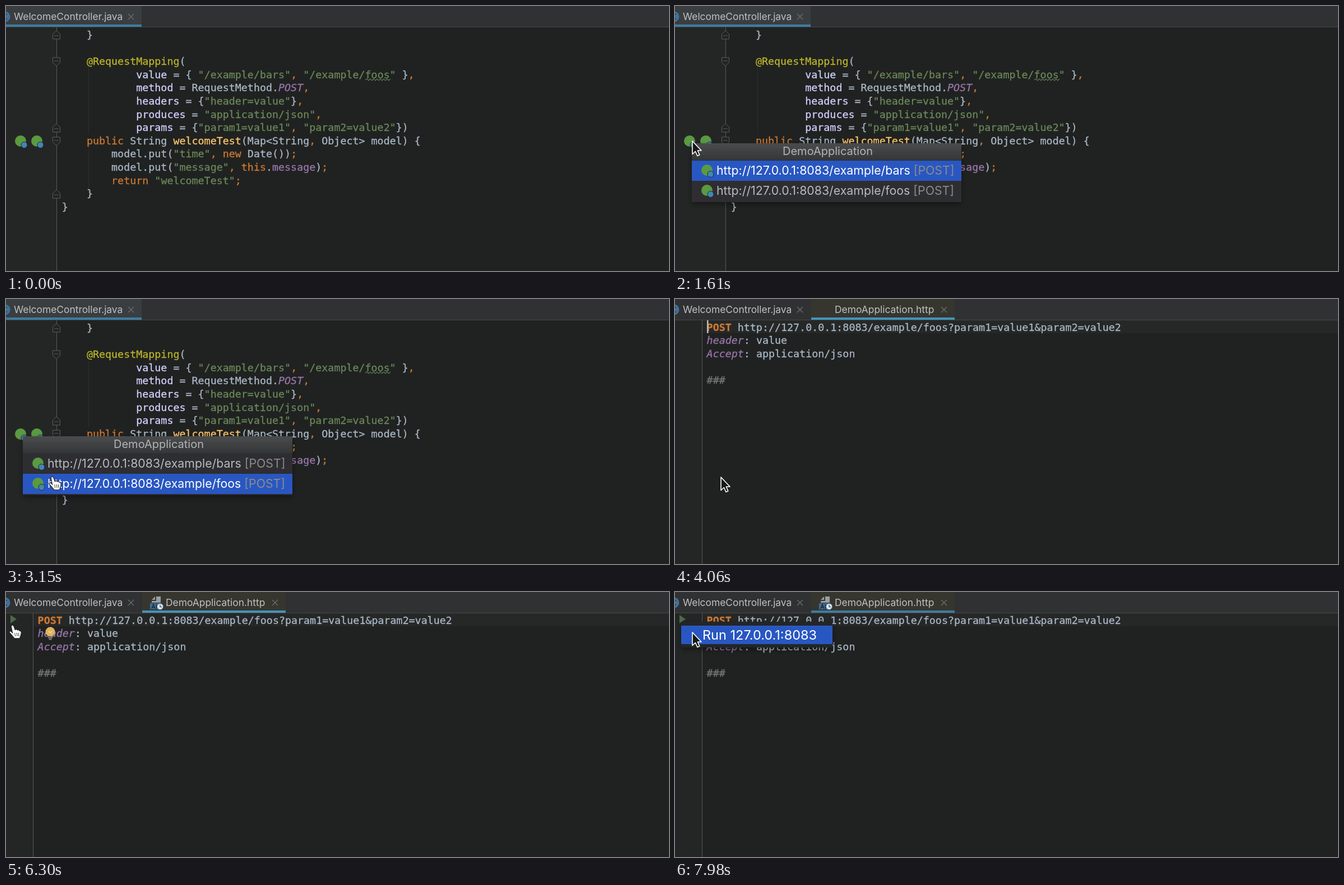
Recreate the animation shown at these times as an HTML page. Size 1183 by 473 pixels, loop 8000 ms.

```html
<!DOCTYPE html>
<html lang="en">
<head>
<meta charset="utf-8">
<title>HTTP request from the editor</title>
<style>
html, body { margin: 0; width: 100%; height: 100%; overflow: hidden; background: #202221; }
svg { display: block; width: 1183px; height: 473px; }
text { white-space: pre; fill: #a9b7c6; }
.code { font: 18.345px "DejaVu Sans Mono", monospace; }
.code tspan { stroke: currentColor; stroke-width: .3; fill: currentColor; }
.code { color: #a9b7c6; }
.ui { font: 17.4px Inter, sans-serif; fill: #bfc1c2; }
.row { font: 21.3px Inter, sans-serif; fill: #b8babc; }
.title { font: 20px Inter, sans-serif; fill: #b2b4b6; text-anchor: middle; }
.menu { font: 23.5px Inter, sans-serif; fill: #fff; }
.key { color: #cc7832; }
.str { color: #6a8759; }
.ann { color: #bbb529; }
.attr { color: #d0d0ff; }
.fn { color: #ffc66d; }
.field { color: #9876aa; }
.const { color: #9876aa; font-style: italic; }
.verb { color: #cc7832; font-weight: bold; }
.note { color: #747676; }
.dim { fill: #8a8c88; }
</style>
</head>
<body>
<svg id="stage" viewBox="0 0 1183 473" xmlns="http://www.w3.org/2000/svg">
  <defs>
    <linearGradient id="head" x1="0" y1="0" x2="0" y2="1">
      <stop offset="0" stop-color="#4a4c4d"/><stop offset="1" stop-color="#343637"/>
    </linearGradient>
    <filter id="shade" x="-10%" y="-20%" width="120%" height="150%">
      <feDropShadow dx="0" dy="4" stdDeviation="5" flood-color="#000" flood-opacity=".4"/>
    </filter>
    <g id="close"><path d="M-5-5L5 5M5-5L-5 5" stroke="#66696b" stroke-width="1.5"/></g>
    <g id="bean">
      <circle r="10" fill="#5a9a41"/>
      <circle cx="6.5" cy="7" r="5.5" fill="#3f87b5" stroke="#232525"/>
    </g>
    <g id="foldStart"><path d="M-6.5-7H6.5V2L0 8L-6.5 2Z M-4-1H4" fill="#222423" stroke="#5a5c5d"/></g>
    <g id="foldEnd"><path d="M-6.5 8H6.5V-1L0-7L-6.5-1Z M-4 2H4" fill="#222423" stroke="#5a5c5d"/></g>
  </defs>

  <rect width="1183" height="473" fill="#202221"/>
  <rect width="1183" height="37" fill="#2f3132"/>

  <g id="javaView">
    <rect y="38" width="90" height="435" fill="#242625"/>
    <path d="M90.5 38V473" stroke="#55585a"/>
    <path d="M147.5 110V229M147.5 252V325" stroke="#2d302f"/>
    <g id="folds"></g>
    <use href="#bean" x="26" y="241"/>
    <use href="#bean" x="55" y="241"/>
    <g id="java" class="code"></g>
    <path id="wave" fill="none" stroke="#5f7d52" stroke-width="1.2"/>
    <rect width="242" height="37" fill="#3a3e40"/>
    <rect y="33" width="242" height="4" fill="#3f7ba0"/>
  </g>

  <g id="httpView">
    <rect y="38" width="48" height="435" fill="#242625"/>
    <rect x="49" y="38" width="1134" height="23" fill="#262827"/>
    <path d="M48.5 38V473" stroke="#55585a"/>
    <g id="http" class="code"></g>
    <rect id="caret" x="57" y="38" width="2.5" height="23" fill="#b9bbbc"/>
    <rect x="243" width="256" height="37" fill="#36362f"/>
    <rect id="underline" x="243" y="33" width="256" height="4"/>
    <text class="ui" x="285" y="25">DemoApplication.http</text>
    <use href="#close" x="480" y="19"/>
    <g id="extras">
      <path d="M8 41L19 48.500L8 56Z" fill="#4c6a46"/>
      <path d="M268 8H276V19H260V16H268Z" fill="#9a9fa2"/>
      <path d="M260 14L266 8V14Z" fill="#9a9fa2"/>
      <rect x="257" y="20" width="19" height="11" fill="#3e6c97"/>
      <path d="M260 30L263 22L266 30M261 27.500H265M268.500 22V30" fill="none" stroke="#1f2a34" stroke-width="1.500"/>
      <circle cx="275" cy="26" r="5.500" fill="#e4eaf0" stroke="#3e6c97"/>
      <path d="M275 22.500V26.500H278" fill="none" stroke="#33597c" stroke-width="1.300"/>
      <circle cx="79" cy="71" r="8.500" fill="#e0b45c"/>
      <path d="M76 70L79 73L82 70" fill="none" stroke="#f3dca6" stroke-width="1.500"/>
      <path d="M75 81.500H83M76.500 84.500H81.500" stroke="#8b8c8a" stroke-width="2"/>
    </g>
  </g>

  <path d="M0 37.500H1183" stroke="#454849"/>
  <circle cx="-2" cy="19" r="9.500" fill="#40719c"/>
  <path d="M2 15.500Q-2 12 -6 19Q-2 26 2 22.500" fill="none" stroke="#25323d" stroke-width="1.500"/>
  <text class="ui" x="14" y="25">WelcomeController.java</text>
  <use href="#close" x="223" y="19"/>

  <g id="popup">
    <g filter="url(#shade)">
      <rect x="30" y="245" width="481" height="105" fill="#2d2f31"/>
      <rect x="30" y="245" width="481" height="30" fill="url(#head)"/>
    </g>
    <text class="title" x="272.500" y="266">DemoApplication</text>
    <rect id="pick" x="30" width="481" height="36" fill="#2957c2"/>
    <use href="#bean" x="57" y="293"/>
    <use href="#bean" x="57" y="329"/>
    <text class="row" x="74" y="301"><tspan>http://127.0.0.1:8083/example/bars</tspan><tspan class="dim"> [POST]</tspan></text>
    <text class="row" x="74" y="337"><tspan>http://127.0.0.1:8083/example/foos</tspan><tspan class="dim"> [POST]</tspan></text>
  </g>

  <g id="runMenu">
    <rect x="11" y="53" width="270" height="46" fill="#242627" filter="url(#shade)"/>
    <rect x="11" y="60" width="270" height="33" fill="#2957c2"/>
    <text class="menu" x="49" y="85">Run 127.0.0.1:8083</text>
  </g>

  <g id="cursor">
    <path id="arrow" d="M0 0V23.500L5.400 18.500L9 26.500L12.800 24.800L9.400 17H16Z" fill="#161817" stroke="#fff" stroke-width="1.600" stroke-linejoin="round"/>
    <g id="hand" transform="translate(-.5 0) scale(.95)">
      <path d="M-2.500 2Q0-2 2.500 2L5 9Q7.500 7 9.500 9.500Q12 8 13.500 11Q17 10.500 16.500 15L15.500 20L13.500 25H3.500L-2 18L-6 13.500Q-5.500 10.500 -2.500 12L0 14.500Z" fill="#fff" stroke="#202221" stroke-width="1.300"/>
      <path d="M4.500 15L5.500 21M8 14.500L9 21M11.500 14.500L12 21" stroke="#4a4c4c" stroke-width="1.200"/>
    </g>
  </g>
</svg>
<script>
const LOOP = 8000, STEP = 70, LINE = 23.65;
const $ = id => document.getElementById(id);
const NS = "http://www.w3.org/2000/svg";

function add(parent, tag, attrs, content = "") {
  const el = document.createElementNS(NS, tag);
  for (const k in attrs) el.setAttribute(k, attrs[k]);
  el.textContent = content;
  return parent.appendChild(el);
}

function addCode(parent, source, x, y, rules) {
  const pattern = new RegExp(rules.map(r => `(${r[1]})`).join("|"), "g");
  source.split("\n").forEach((line, i) => {
    const text = add(parent, "text", { x, y: y + i * LINE });
    let end = 0;
    for (const m of line.matchAll(pattern)) {
      if (m.index > end) add(text, "tspan", {}, line.slice(end, m.index));
      const kind = m.slice(1).findIndex(g => g !== undefined);
      add(text, "tspan", { class: rules[kind][0] }, m[0]);
      end = m.index + m[0].length;
    }
    if (end < line.length) add(text, "tspan", {}, line.slice(end));
  });
}

addCode($("java"), `    }

    @RequestMapping(
            value = { "/example/bars", "/example/foos" },
            method = RequestMethod.POST,
            headers = {"header=value"},
            produces = "application/json",
            params = {"param1=value1", "param2=value2"})
    public String welcomeTest(Map<String, Object> model) {
        model.put("time", new Date());
        model.put("message", this.message);
        return "welcomeTest";
    }
}`, 99.8, 57.6, [
  ["str", '"[^"]*"'],
  ["ann", "@\\w+"],
  ["attr", "\\w+(?= = )"],
  ["key", "\\b(?:public|new|return|this)\\b|[,;]"],
  ["const", "\\bPOST\\b"],
  ["field", "\\bmessage\\b"],
  ["fn", "\\bwelcomeTest\\b"]
]);

addCode($("http"), `POST http://127.0.0.1:8083/example/foos?param1=value1&param2=value2
header: value
Accept: application/json

###`, 56.6, 56.8, [
  ["verb", "^POST"],
  ["const", "^\\w+(?=:)"],
  ["note", "^###"]
]);

[[51, "End"], [99, "Start"], [217, "End"], [241, "Start"], [335, "End"]].forEach(([y, kind]) =>
  add($("folds"), "use", { href: "#fold" + kind, x: 90, y }));

let wave = "M641 132";
for (let i = 1; i <= 15; i++) wave += `L${641 + i * 3} ${i % 2 ? 130 : 133}`;
$("wave").setAttribute("d", wave);

// Pointer tip: time, x, y
const path = [
  [630, 250, 473], [910, 140, 400], [1120, 60, 290], [1330, 31, 243], [1610, 31, 241],
  [2030, 31, 241], [2240, 46, 268], [2520, 76, 308], [2730, 83, 317], [3430, 83, 317],
  [3570, 82, 318], [4830, 82, 318], [5040, 66, 310], [5180, 41, 297], [5530, 24, 215],
  [5880, 13, 122], [6160, 12, 59], [6930, 12, 59], [7280, 31, 72], [8000, 31, 72]
];

function pointer(t) {
  const i = Math.max(1, path.findIndex(p => p[0] >= t));
  const [t0, x0, y0] = path[i - 1], [t1, x1, y1] = path[i];
  const k = (t - t0) / (t1 - t0);
  return [x0 + (x1 - x0) * k, y0 + (y1 - y0) * k];
}

const show = (id, on) => $(id).style.display = on ? "" : "none";

function draw(t) {
  const http = t >= 3710, popup = t >= 1400 && t < 3500, menu = t >= 6790;
  show("javaView", !http);
  show("httpView", http);
  show("extras", t >= 4410);
  show("caret", !menu && Math.floor((t - 3600) / 500) % 2 === 0);
  $("underline").setAttribute("fill", menu ? "#3f7ba0" : "#4394b8");

  show("popup", popup);
  const second = t >= 2590;
  $("pick").setAttribute("y", second ? 312 : 276);
  document.querySelectorAll(".row").forEach((row, i) => {
    row.firstChild.style.fill = (i === 1) === second ? "#fff" : "";
  });
  show("runMenu", menu);

  show("cursor", t >= 630);
  if (t < 630) return;
  const [x, y] = pointer(t);
  const hand = popup && y > 276 || http && !menu && y < 64;
  $("cursor").setAttribute("transform", `translate(${x.toFixed(1)} ${y.toFixed(1)})`);
  show("hand", hand);
  show("arrow", !hand);
}

function tick(now) {
  const t = now % LOOP;
  draw(Math.floor(t / STEP) * STEP);
  requestAnimationFrame(tick);
}
draw(0);
requestAnimationFrame(tick);
</script>
</body>
</html>
```
